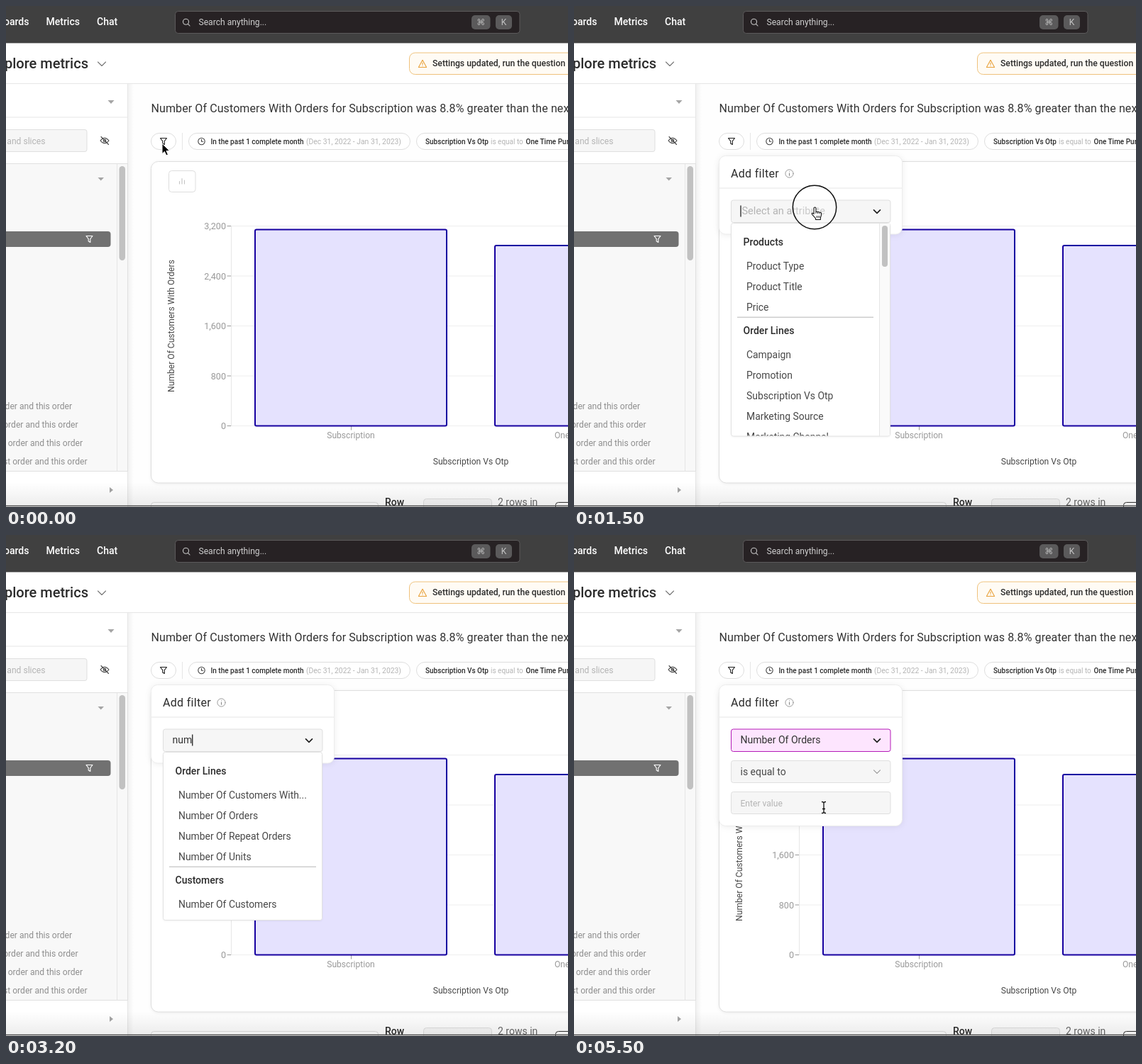
These frames come from a looping animation (792x707 px, 5730 ms). An HTML page:

```html
<!DOCTYPE html>
<html lang="en">
<head>
<meta charset="utf-8">
<title>Add filter</title>
<style>
  html, body { margin: 0; width: 100%; height: 100%; overflow: hidden; background: #fff; }
  svg { display: block; }
  text { font: 14px Roboto, sans-serif; fill: #484848; white-space: pre; }
  .s10 { font-size: 10px; } .s12 { font-size: 12.1px; } .s16 { font-size: 16px; }
  .med { font-weight: 500; fill: #2c2c2c; }
  .dim { fill: #999; } .faint { fill: #b4b4b4; } .light { fill: #fff; }
  .end { text-anchor: end; } .mid { text-anchor: middle; }
  .box { fill: #fff; stroke: #dedede; }
  .field { fill: #f6f6f6; stroke: #dfdfdf; }
  .line { fill: none; stroke: #e6e6e6; }
  .icon { fill: none; stroke: #444; stroke-width: 1.1; stroke-linejoin: round; stroke-linecap: round; }
  .card { fill: #fff; stroke: #ececec; filter: drop-shadow(0 1px 4px #00000012); }
  .menu { fill: #fff; stroke: #e2e2e2; filter: drop-shadow(0 1px 1px #0000000c); }
  .bar { fill: #e5e2fe; stroke: #1600a0; stroke-width: 2; }
</style>
</head>
<body>
<svg id="stage" width="792" height="707" viewBox="0 0 792 707">
  <defs>
    <linearGradient id="shade" x2="0" y2="1"><stop stop-opacity="0"/><stop offset="1" stop-opacity=".07"/></linearGradient>
    <linearGradient id="edge"><stop stop-opacity=".05"/><stop offset="1" stop-opacity="0"/></linearGradient>
    <path id="funnel" d="M-4.5-4.5H4.5L1.3-.3V4.5L-1.3 3V-.3Z"/>
    <path id="chevron" d="M-4.5-2.2L0 2.3L4.5-2.2"/>
  </defs>

  <!-- Page -->
  <rect width="792" height="707" fill="#fefefe"/>
  <rect x="172" y="110" width="8" height="597" fill="url(#edge)"/>
  <text x="204.5" y="150" class="s16" style="letter-spacing:.1px;fill:#333">Number Of Customers With Orders for Subscription was 8.8% greater than the next</text>

  <!-- Filter chips -->
  <rect x="204.5" y="179.5" width="35" height="23" rx="11.5" class="box"/>
  <use href="#funnel" x="222" y="191" class="icon" style="stroke:#222"/>
  <path d="M248.5 179V203" class="line"/>
  <rect x="257.5" y="179.5" width="312" height="23" rx="11.5" class="box"/>
  <circle cx="275.5" cy="191" r="4.7" class="icon"/><path d="M275.5 188.3V191.2H277.8" class="icon"/>
  <text x="288.5" y="194.8" class="s10 med">In the past 1 complete month</text>
  <text x="423" y="194.8" class="s10 faint" style="font-size:10.35px">(Dec 31, 2022 - Jan 31, 2023)</text>
  <rect x="578.5" y="179.5" width="300" height="23" rx="11.5" class="box"/>
  <text x="591" y="194.8" class="s10 med">Subscription Vs Otp</text>
  <text x="683" y="194.8" class="s10 faint">is equal to</text>
  <text x="732.5" y="194.8" class="s10 med">One Time Purchase</text>

  <!-- Chart -->
  <rect x="204.5" y="219.5" width="640" height="453.5" rx="10" class="box" style="filter:drop-shadow(0 1px 2px #0001)"/>
  <rect x="229.5" y="232.5" width="37.5" height="30" rx="4" class="box"/>
  <path d="M244.5 251V247.5M248 251V243.5M251.5 251V246" class="icon" style="stroke:#c4c4c4"/>
  <g id="axis"></g>
  <rect x="351" y="315.5" width="270" height="277" rx="2" class="bar"/>
  <rect x="689" y="338" width="270" height="254.5" rx="2" class="bar"/>
  <text x="486" y="609.5" class="s12 dim mid">Subscription</text>
  <text x="773" y="609.5" class="s12 dim">One Time Purchase</text>
  <text x="655" y="647" class="s12 mid">Subscription Vs Otp</text>
  <text transform="translate(237 451.5) rotate(-90)" class="s12 mid">Number Of Customers With Orders</text>

  <!-- Footer -->
  <rect x="204.5" y="700.5" width="320" height="30" rx="4" class="box"/>
  <text x="534" y="705" class="med">Row</text>
  <rect x="588.5" y="695.5" width="96" height="30" rx="4" class="field"/>
  <text x="693" y="705" style="fill:#666">2 rows in</text>
  <rect x="774.5" y="700.5" width="60" height="30" rx="4" class="box" style="stroke:#333"/>

  <!-- Sidebar -->
  <rect y="110" width="171" height="597" fill="#fff"/>
  <path d="M0 157H171M171.5 110V707" class="line"/>
  <rect x="-9" y="174.5" width="123" height="31" rx="3" class="field"/>
  <text x="55.5" y="194.5" class="s12 faint end">Search metrics and slices</text>
  <path d="M133 190Q139 182.5 145 190Q139 197.5 133 190M134 184.5L144.5 195.5" class="icon"/>
  <circle cx="139" cy="190" r="1.8" class="icon"/>
  <rect x="-1" y="222.5" width="172.5" height="434" fill="#f8f8f8" stroke="#e0e0e0"/>
  <path d="M156.5 223V656" class="line"/>
  <rect x="159.5" y="226" width="8.5" height="133" rx="4.2" fill="#c1c1c1"/>
  <path d="M143.5 133H152.5L148 138ZM129.5 242H138L133.7 246.5ZM146 679L151 683L146 687Z" fill="#a5a5a5"/>
  <rect x="-9" y="318" width="156.5" height="22" rx="4" fill="#717171"/>
  <use href="#funnel" x="117.5" y="329" class="icon" style="stroke:#fff"/>
  <g class="s12" id="sideRows"></g>

  <!-- Headers -->
  <rect y="52" width="792" height="57" fill="#fff"/>
  <path d="M0 109.5H792" class="line"/>
  <text x="116" y="88.3" class="med end" style="font-size:20px">Explore metrics</text>
  <path d="M129.5 79L135 84.5L140.5 79" class="icon" style="stroke:#777"/>
  <rect x="568.5" y="66" width="300" height="30.5" rx="8" fill="#fffbf4" stroke="#efc27c"/>
  <path d="M587 76.3L592.6 86.5H581.4ZM587 80V82.7M587 84.5V84.6" class="icon" style="stroke:#e9a23b"/>
  <text x="601" y="85.2" class="med" style="font-size:12.2px">Settings updated, run the question</text>
  <rect width="792" height="52.4" fill="#404040"/>
  <text x="32.5" y="27.3" class="med light end">Dashboards</text>
  <text x="56.5" y="27.3" class="med light">Metrics</text>
  <text x="128" y="27.3" class="med light">Chat</text>
  <rect x="238.5" y="7.5" width="485.5" height="31" rx="4" fill="#272224" stroke="#5c5a5b"/>
  <circle cx="253.5" cy="22.3" r="4" class="icon" style="stroke:#ccc"/><path d="M256.5 25.3L259 28" class="icon" style="stroke:#ccc"/>
  <text x="271.5" y="27" class="s12" style="fill:#cfcfcf">Search anything...</text>
  <rect x="656" y="13" width="26.5" height="20" rx="5" fill="#5b5a5b"/>
  <rect x="690" y="13" width="23" height="20" rx="5" fill="#5b5a5b"/>
  <text x="669.2" y="27" class="mid" style="font:12px 'DejaVu Sans',sans-serif;fill:#bbb">⌘</text>
  <text x="701.5" y="27" class="s12 mid" style="fill:#c4c4c4">K</text>
  <rect y="672" width="792" height="33" fill="url(#shade)"/>
  <path d="M0 705.5H792" stroke="#4a4a4a" stroke-width="1.4"/>

  <!-- Filter popup -->
  <g id="popup">
    <rect id="panel" x="204.5" y="211.5" width="258" rx="9" class="card"/>
    <text x="221" y="242" class="s16" style="letter-spacing:.3px;fill:#2c2c2c">Add filter</text>
    <circle cx="303.5" cy="236.5" r="5.6" class="icon" style="stroke:#999;stroke-width:1"/>
    <path d="M303.5 236V239.3M303.5 233.7V233.8" class="icon" style="stroke:#888"/>
    <path d="M205 257H462" class="line"/>
    <rect id="attribute" x="221.5" y="274" width="224.5" height="31.5" rx="3" class="field"/>
    <text id="placeholder" x="236.5" y="294.3" class="faint" style="font-size:14.5px">Select an attribute</text>
    <text id="typed" x="234.5" y="294.3" style="fill:#333"></text>
    <path id="caret" d="M0 281.5V297.5" stroke="#222" stroke-width="1.3"/>
    <use id="arrow" href="#chevron" x="427" y="290" class="icon" style="stroke-width:1.7"/>
    <g id="valueFields">
      <rect x="221.5" y="318.5" width="224.5" height="31" rx="3" class="field"/>
      <text x="234.5" y="338.5">is equal to</text>
      <use href="#chevron" x="427" y="334" class="icon" style="stroke:#999"/>
      <rect x="221.5" y="362.5" width="224.5" height="31" rx="3" class="field"/>
      <text x="234.5" y="382.5" class="s12 faint">Enter value</text>
    </g>
  </g>
  <g id="menus"></g>

  <circle id="ring" r="30.7" fill="#fff" fill-opacity=".3" stroke="#111" stroke-width="1.5"/>
  <g id="pointers" stroke-linejoin="round">
    <path id="pointer" d="M0 0V14.5L3.4 11.4L5.8 16.8L8.4 15.7L6 10.4H10.5Z" fill="#000" stroke="#fff"/>
    <g id="hand" fill="#fff" stroke="#111" stroke-width="1.1">
      <path d="M2 1.5a1.5 1.5 0 0 1 3 0V6.6q1.3-.9 2.5.2q1.3-.7 2.4.5q2.5-.5 2.6 1.8c.2 2.5-.2 4-1.2 5.8V17.5H4.6V16C3.5 14-.6 10.6-.8 9.3c0-1.6 1.7-1.4 2.8.2Z"/>
      <path d="M5 6.5V9M7.5 7V9.3M9.9 7.5V9.5M6 12V15M8 12V15M10 12V15" stroke-width=".8"/>
    </g>
    <path id="beam" d="M-3-8Q0-8 0-6Q0-8 3-8M0-6V6M-3 8Q0 8 0 6Q0 8 3 8M-2 2H2" fill="none" stroke="#111" stroke-width="1.3"/>
  </g>
</svg>
<script>
const LOOP = 5730, STEP = 100;
const $ = id => document.getElementById(id);
const show = (id, on) => { $(id).style.display = on ? '' : 'none'; };
const progress = (t, start, end) => Math.min(1, Math.max(0, (t - start) / (end - start)));

$('axis').innerHTML = ['3,200', '2,400', '1,600', '800', '0'].map((label, i) => {
  const y = 310.5 + i * 70.5;
  return `<path d="M318 ${y}H792" class="line" style="stroke:#eee"/><path d="M311.5 ${y}H317.5" stroke="#999"/>
    <text x="310" y="${y + 4.8}" class="dim end" style="font-size:12.6px">${label}</text>`;
}).join('') + '<path d="M317.5 310V593" class="line"/><path d="M486.5 593V598.5" stroke="#999"/>';

$('sideRows').innerHTML = [93, 101.5, 108, 114.5].map((x, i) =>
  `<text x="${x}" y="${568.5 + i * 26}" class="s12 end" style="fill:#8e8e8e">${i == 3 ? 'last order' : 'order'} and this order</text>`).join('');

// A dropdown of titled groups; thumb is the scrollbar length, 0 for none.
function menu(id, groups, bottom, thumb) {
  const right = thumb ? 422 : 437;
  let y = 338, body = '';
  groups.forEach(([title, ...rows], i) => {
    if (i) body += `<path d="M230 ${y - 23.8}H${right}" stroke="#b5b5b5"/>`;
    body += `<text x="238.5" y="${y}" class="med">${title}</text>`;
    rows.forEach((row, k) => body += `<text x="243" y="${y + 33.5 + k * 29}" style="font-size:13.9px">${row}</text>`);
    y += 67 + (rows.length - 1) * 29;
  });
  const scroll = thumb ? `<path d="M431 307H445V${bottom - 1}H431Z" fill="#fafafa"/><path d="M430.5 307V${bottom}" class="line"/>
    <rect x="434" y="310" width="8" height="${thumb}" rx="4" fill="#c1c1c1"/>` : '';
  $('menus').innerHTML += `<g id="${id}"><rect x="221.5" y="306.5" width="224" height="${bottom - 306.5}" rx="3" class="menu"/>
    ${thumb ? '' : '<rect id="hover" x="230" y="381" width="207" height="29" rx="3" fill="#ededed"/>'}
    <svg width="792" height="${bottom - .5}">${body}</svg>${scroll}</g>`;
}
const lines = ['Order Lines', 'Campaign', 'Promotion', 'Subscription Vs Otp', 'Marketing Source', 'Marketing Channel'];
menu('menuAll', [['Products', 'Product Type', 'Product Title', 'Price'], lines], 607, 58);
menu('menuN', [[...lines, 'New Vs Repeat', 'Order Date', 'Order Week', 'Order Month']], 607, 79);
menu('menuNumber', [
  ['Order Lines', 'Number Of Customers With...', 'Number Of Orders', 'Number Of Repeat Orders', 'Number Of Units'],
  ['Customers', 'Number Of Customers']], 543.5, 0);

const typing = ['n', 'nu', 'num', 'numbe', 'number', 'number ', 'number o', 'number of', 'number of '];
const clicks = [[100, 220, 190], [1500, 339, 284], [5000, 351, 391]];

// Each move: start, end, then from and to positions.
const moves = [
  [800, 1400, 220, 194, 336, 284],
  [4000, 4600, 336, 284, 348, 388.5],
  [5200, 5500, 351, 389, 352, 384.5]];

function draw(t) {
  const open = t >= 1500 && t < 5000, chosen = t >= 5000;
  const typed = t < 3000 || chosen ? '' : typing[Math.min(8, (t - 3000) / STEP)];

  $('popup').style.opacity = t < 100 ? 0 : 1 - (1 - progress(t, 0, 600)) ** 3;
  $('panel').setAttribute('height', chosen ? 199 : 110.5);
  $('attribute').style.cssText = chosen ? 'fill:#fde5fe;stroke:#b41bb8' : '';
  $('arrow').style.stroke = t < 1500 ? '#888' : '#222';
  show('placeholder', t < 3000);
  show('valueFields', chosen);
  $('typed').textContent = chosen ? 'Number Of Orders' : typed;

  const caretOff = [[1800, 2200], [2500, 2900], [4100, 5000]].some(([a, b]) => t >= a && t < b);
  show('caret', open && !caretOff);
  const advance = typed ? $('typed').getComputedTextLength() : 0;
  $('caret').setAttribute('transform', `translate(${235 + advance})`);

  show('menuAll', open && t < 3000);
  show('menuN', typed === 'n');
  show('menuNumber', typed.length > 1);
  $('hover').style.opacity = progress(t, 4600, 4900);

  const click = clicks.find(([at]) => t === at);
  show('ring', click);
  if (click) $('ring').setAttribute('transform', `translate(${click[1]} ${click[2]})`);

  const [start, end, x0, y0, x1, y1] = moves[t < 3000 ? 0 : t < 5200 ? 1 : 2];
  const p = progress(t, start, end);
  const beam = t >= 5300, hand = t >= 1400 && !beam;
  show('pointers', t < 3000 || t >= 4100);
  show('pointer', t < 1400);
  show('hand', hand);
  show('beam', beam);
  $('pointers').setAttribute('transform', `translate(${x0 + (x1 - x0) * p} ${y0 + (y1 - y0) * p})`);
}

function tick() {
  draw(Math.floor(performance.now() % LOOP / STEP) * STEP);
  requestAnimationFrame(tick);
}
tick();
</script>
</body>
</html>
```
